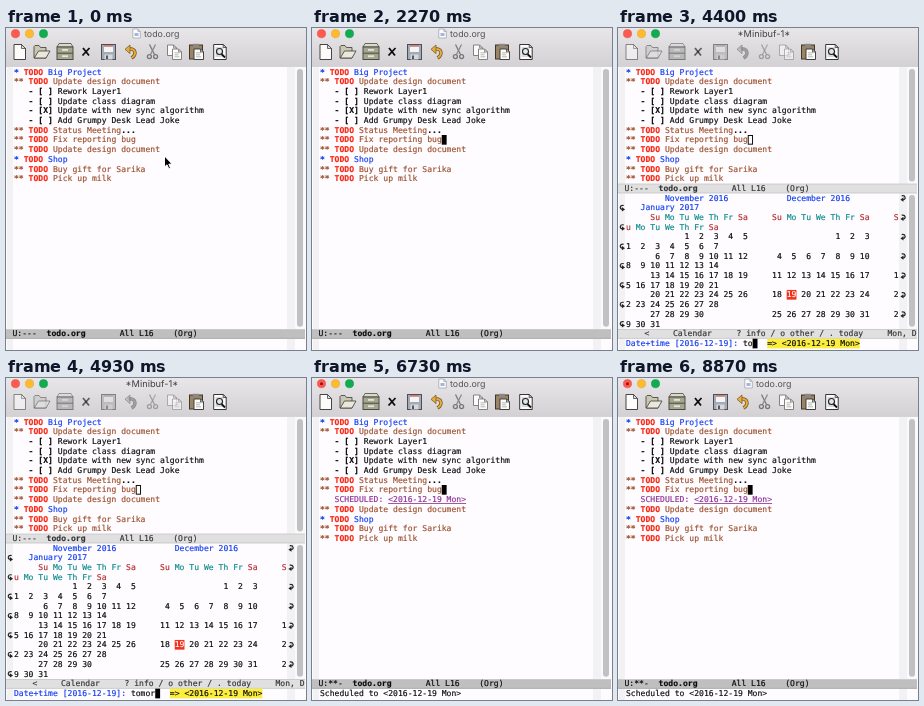
Write an HTML page with a canvas that moves like this. It is 300 px wide and 322 px high and loops after 8.99 s.

```html
<!DOCTYPE html>
<html lang="en">
<head>
<meta charset="utf-8">
<title>todo.org</title>
<style>
html, body { margin: 0; width: 300px; height: 322px; overflow: hidden; background: #fff; }
canvas { display: block; }
</style>
</head>
<body>
<canvas id="stage" width="300" height="322"></canvas>
<script>
const ctx = document.getElementById('stage').getContext('2d');
const LOOP = 8990;
const COL = 4.87, ROW = 9.685, LEFT = 8, TOP = 39.2, WRAP = 56;
const C = {
  paper: '#fefcff', blue: '#0f3cf0', sienna: '#9c4f2c', red: '#fb2512', black: '#0a0a0a',
  teal: '#0a8a8a', brick: '#b3282a', purple: '#8c2f93', fringe: '#f2f1f3', yellow: '#fbee3c', dim: '#333'
};
const MONO = '"DejaVu Sans Mono", monospace';
const SANS = 'Inter, "Liberation Sans", sans-serif';

const rect = (x, y, w, h, color) => { ctx.fillStyle = color; ctx.fillRect(x, y, w, h); };
const frame = (x, y, w, h, color) => { ctx.strokeStyle = color; ctx.lineWidth = 1; ctx.strokeRect(x, y, w, h); };
const rowY = row => TOP + row * ROW;
const colX = col => LEFT + col * COL;

// Type is laid out at ten times its size so that advances stay fractional.
function type(str, x, y, color, size, family, weight = 400, swell = 0) {
  ctx.save();
  ctx.translate(x, y);
  ctx.scale(0.1, 0.1);
  ctx.textRendering = 'geometricPrecision';
  ctx.font = `${weight} ${size * 10}px ${family}`;
  ctx.fillStyle = ctx.strokeStyle = color;
  ctx.fillText(str, 0, 0);
  if (swell) {
    ctx.lineWidth = swell * 10;
    ctx.strokeText(str, 0, 0);
  }
  ctx.restore();
}
const mono = (str, x, row, color = C.black, weight = 400) =>
  type(str, x, rowY(row) + 7.5, color, 8.09, MONO, weight, 0.16);
const put = (str, col, row, color, weight) => mono(str, colX(col), row, color, weight);

function poly(points, fill, stroke, width = 0.8) {
  ctx.beginPath();
  points.forEach(([x, y], i) => i ? ctx.lineTo(x, y) : ctx.moveTo(x, y));
  ctx.closePath();
  if (fill) { ctx.fillStyle = fill; ctx.fill(); }
  if (stroke) { ctx.strokeStyle = stroke; ctx.lineWidth = width; ctx.stroke(); }
}
function line(x1, y1, x2, y2, color, width = 1) {
  ctx.beginPath();
  ctx.moveTo(x1, y1);
  ctx.lineTo(x2, y2);
  ctx.strokeStyle = color;
  ctx.lineWidth = width;
  ctx.stroke();
}
function disc(x, y, r, fill, stroke, width = 0.8) {
  ctx.beginPath();
  ctx.arc(x, y, r, 0, 7);
  if (fill) { ctx.fillStyle = fill; ctx.fill(); }
  if (stroke) { ctx.strokeStyle = stroke; ctx.lineWidth = width; ctx.stroke(); }
}

function page(x, y, w, h, fold = 4, ink = '#333') {
  poly([[x, y], [x + w - fold, y], [x + w, y + fold], [x + w, y + h], [x, y + h]], '#fcfcfa', ink, 0.9);
  poly([[x + w - fold, y], [x + w - fold, y + fold], [x + w, y + fold]], '#ddd', ink, 0.7);
}
function scribble(x, y, w, n) {
  for (let i = 0; i < n; i++) line(x, y + i * 2, x + w - (i % 2), y + i * 2, '#999', 0.7);
}

const icons = {
  blank() { page(8, 16.5, 11.5, 15); },
  folder() {
    poly([[28, 30], [28, 18.5], [29, 17.5], [33, 17.5], [34.5, 19.5], [40, 19.5], [40, 30]], '#c9c8b4', '#3b3b33');
    poly([[28.3, 30], [32.5, 23], [44, 23], [40, 30]], '#e9e8da', '#3b3b33');
  },
  drawer() {
    poly([[51, 19], [53, 15.5], [65, 15.5], [67, 19]], '#d9dbcb', '#4a4c40');
    rect(51, 19, 16, 12.5, '#a3a78f');
    frame(51, 19, 16, 12.5, '#4a4c40');
    line(51, 25.2, 67, 25.2, '#4a4c40');
    rect(56, 21, 6, 1.8, '#e4e5d8');
    rect(56, 27.3, 6, 1.8, '#e4e5d8');
  },
  cross() {
    line(77, 20, 83, 27.5, '#0c0c0c', 1.8);
    line(83.5, 20, 76.5, 27.5, '#0c0c0c', 1.8);
  },
  save() {
    rect(95.5, 16.5, 14, 15, '#a4abb4');
    frame(95.5, 16.5, 14, 15, '#4b5058');
    rect(98, 17, 9, 7, '#f5f5f5');
    rect(98, 17, 9, 1.8, '#c98078');
    rect(98.5, 26.5, 8, 5, '#d5d9dd');
    rect(100, 27.5, 2, 3.5, '#545a64');
  },
  undo() {
    ctx.beginPath();
    ctx.moveTo(122.5, 21);
    ctx.bezierCurveTo(130.5, 20, 130.5, 27, 125.5, 30);
    ctx.strokeStyle = '#6b5120';
    ctx.lineWidth = 3.4;
    ctx.stroke();
    ctx.strokeStyle = '#e9ab3c';
    ctx.lineWidth = 2;
    ctx.stroke();
    poly([[119, 21.3], [124, 17], [124, 25.6]], '#e9ab3c', '#6b5120', 0.7);
  },
  cut() {
    line(143.5, 16.5, 148.5, 26.5, '#777', 1.3);
    line(149.5, 16.5, 144.5, 26.5, '#888', 1.3);
    disc(143.4, 28.6, 2, null, '#777', 1.3);
    disc(149.6, 28.6, 2, null, '#777', 1.3);
  },
  copy() {
    page(161.5, 17, 9, 10.5, 3, '#777');
    page(166.5, 21, 9, 10.5, 3, '#777');
    scribble(168.5, 24.8, 5, 3);
  },
  paste() {
    rect(183.5, 17, 13, 14, '#9a8466');
    frame(183.5, 17, 13, 14, '#40352a');
    rect(187, 15.8, 6, 3, '#888');
    page(188, 21, 9.5, 10.5, 3);
    scribble(190, 24.8, 5, 3);
  },
  find() {
    page(207.7, 16.5, 12.5, 15, 3, '#222');
    scribble(209.5, 20, 8, 5);
    line(215.5, 26, 219, 29.5, '#111', 1.8);
    disc(213.5, 23.5, 3, 'rgba(225,232,238,.9)', '#222', 1.1);
  }
};

function chrome(title, prompt, edited) {
  const g = ctx.createLinearGradient(0, 0, 0, 38);
  g.addColorStop(0, '#e8e6e8');
  g.addColorStop(1, '#d3d1d3');
  rect(0, 0, 300, 38, g);
  rect(0, 38, 300, 0.6, '#b9b9b9');
  disc(9.5, 5.7, 4.1, '#ff5a50', '#e2463d', 0.5);
  disc(23.5, 5.7, 4.1, '#ffbb30', '#dfa023', 0.5);
  disc(37.5, 5.7, 4.1, '#10ac50', '#0d9645', 0.5);
  if (edited) disc(9.5, 5.7, 1.5, '#8c1410');
  if (prompt) {
    type(title, 119.5, 8.6, '#404040', 9.3, SANS);
  } else {
    page(126.8, 1, 7.5, 9, 2.5, '#a9adbb');
    rect(128.5, 5, 4, 3, '#a9b4dc');
    type(title, 138, 8.6, '#555', 8.9, SANS);
  }
  for (const name in icons) {
    const faded = prompt && !/paste|find/.test(name);
    ctx.filter = faded ? 'grayscale(1)' : 'none';
    ctx.globalAlpha = faded ? 0.6 : 1;
    icons[name]();
  }
  ctx.filter = 'none';
  ctx.globalAlpha = 1;
}

function body() {
  rect(0, 38, 300, 284, C.paper);
  rect(1, 39, 6, 283, C.fringe);
  rect(281, 39, 8, 283, C.fringe);
}

function scrollbar(top, bottom) {
  rect(289, top, 10, bottom - top, '#faf9fb');
  line(294, top + 5, 294, bottom - 5, '#c1c0c3', 6);
  disc(294, top + 5, 3, '#c1c0c3');
  disc(294, bottom - 5, 3, '#c1c0c3');
}

function modeline(row, active) {
  rect(0, rowY(row) + 0.3, 299, ROW - 0.1, active ? '#bfbfbf' : '#e0e0e0');
  rect(0, rowY(row) + 0.3, 299, 0.7, active ? '#d0d0d0' : '#c4c4c4');
  rect(0, rowY(row + 1) - 0.5, 299, 0.7, active ? '#9c9c9c' : '#c0c0c0');
}
function fileLine(row, flags, active) {
  const color = active ? C.black : C.dim;
  modeline(row, active);
  mono('U:' + flags, 6.5, row, color);
  mono('todo.org', 6.5 + 7 * COL, row, color, 700);
  mono('All L16    (Org)', 6.5 + 22 * COL, row, color);
}

const outline = [
  [1, 'Big Project'],
  [2, 'Update design document'],
  [0, ' ', 'Rework Layer1'],
  [0, ' ', 'Update class diagram'],
  [0, 'X', 'Update with new sync algorithm'],
  [0, ' ', 'Add Grumpy Desk Lead Joke'],
  [2, 'Status Meeting'],
  [2, 'Fix reporting bug'],
  [2, 'Update design document'],
  [1, 'Shop'],
  [2, 'Buy gift for Sarika'],
  [2, 'Pick up milk']
];

function org(scheduled) {
  outline.forEach(([level, head, item], i) => {
    const row = i + (scheduled && i > 7 ? 1 : 0);
    if (!level) {
      put('-', 3, row, C.black, 700);
      put(`[${head}]`, 5, row, C.black, 700);
      put(item, 9, row);
      return;
    }
    const color = level === 1 ? C.blue : C.sienna;
    put('*'.repeat(level), 0, row, color, 700);
    put('TODO', level + 1, row, C.red, 700);
    put(head, level + 6, row, color);
    if (i === 6) put('...', level + 6 + head.length, row, C.black, 700);
  });
  if (scheduled) {
    put('SCHEDULED:', 3, 8, C.purple);
    put('<2016-12-19 Mon>', 14, 8, C.purple);
    rect(colX(14), rowY(8) + 8.4, 16 * COL, 0.8, C.purple);
  }
}

// Prints one long calendar line, folded at the window width.
function fold(str, col, row, color) {
  const cut = Math.max(0, Math.min(str.length, WRAP - col));
  if (cut) put(str.slice(0, cut), col, row, color);
  if (cut < str.length) put(str.slice(cut), Math.max(0, col - WRAP), row + 1, color);
}

function bend(x, y, dir) {
  ctx.save();
  ctx.translate(x, y);
  ctx.scale(dir, 1);
  ctx.beginPath();
  ctx.moveTo(-1.5, -2.3);
  ctx.bezierCurveTo(2.8, -3, 2.8, 1.6, 0, 1.6);
  ctx.strokeStyle = '#222';
  ctx.lineWidth = 1.2;
  ctx.stroke();
  poly([[-2.8, 1.6], [0.3, -0.8], [0.3, 3.6]], '#222');
  ctx.restore();
}

function calendar() {
  const months = [['November 2016', 2, 30], ['December 2016', 4, 31], ['January 2017', 0, 31]];
  months.forEach(([name, first, days], m) => {
    const col = 5 + 25 * m;
    fold(name, col + Math.floor((20 - name.length) / 2), 13, C.blue);
    'Su Mo Tu We Th Fr Sa'.split(' ').forEach((day, i) =>
      fold(day, col + 3 * i, 15, i % 6 ? C.teal : C.brick));
    for (let d = 1; d <= days; d++) {
      const cell = first + d - 1;
      const x = col + 3 * (cell % 7), row = 17 + 2 * Math.floor(cell / 7);
      const picked = m === 1 && d === 19;
      if (picked) rect(colX(x), rowY(row), 2 * COL, ROW, '#f5301c');
      fold(String(d).padStart(2), x, row, picked ? '#fff' : C.black);
    }
  });
  for (let row = 13; row < 27; row += 2) {
    bend(285.2, rowY(row) + 5, 1);
    bend(4.2, rowY(row + 1) + 5, -1);
  }
  modeline(27, false);
  mono('<', 26.5, 27, C.dim);
  mono('Calendar', 55, 27, C.dim);
  mono('? info / o other / . today', 118.5, 27, C.dim);
  mono('Mon, D', 269.5, 27, C.dim);
}

function prompt(typed, cursorOn) {
  const end = 24 + typed.length;
  put('Date+time [2016-12-19]:', 0, 28, C.blue);
  put(typed, 24, 28);
  if (cursorOn) rect(colX(end), rowY(28) + 0.3, COL, ROW, '#000');
  rect(colX(end + 3), rowY(28) + 0.3, 19 * COL, ROW, C.yellow);
  put('=> <2016-12-19 Mon>', end + 3, 28);
}

function pointer(x, y) {
  poly([[x, y], [x, y + 11], [x + 2.5, y + 8.8], [x + 4.3, y + 12.8], [x + 6, y + 12],
    [x + 4.3, y + 8.2], [x + 7.6, y + 8]], '#000', '#fff', 1);
}

const within = (t, spans) => spans.some(([a, b]) => t >= a && t < b);
const MAIN_ON = [[270, 730], [1270, 1730], [2270, 2530], [6730, 7270], [7730, 8270], [8800, LOOP]];
const PROMPT_ON = [[2530, 3000], [3530, 4000], [4270, 5870], [6330, 6730]];
const KEYS = [4270, 4400, 4530, 4670, 4870, 5070, 5200, 5330];

function draw(t) {
  const asking = t >= 2530 && t < 6730, done = t >= 6730;
  body();
  chrome(asking ? '*Minibuf-1*' : 'todo.org', asking, done);
  org(done);
  if (asking) {
    scrollbar(39, rowY(12));
    scrollbar(rowY(13), rowY(27));
    frame(colX(25) + 0.5, rowY(7) + 0.5, COL - 0.6, ROW - 1, '#111');
    fileLine(12, '---', false);
    calendar();
    prompt('tomorrow'.slice(0, KEYS.filter(k => t >= k).length), within(t, PROMPT_ON));
  } else {
    scrollbar(39, rowY(27));
    if (within(t, MAIN_ON)) rect(colX(25), rowY(7), COL, ROW, '#000');
    fileLine(27, done ? '**-' : '---', true);
    if (done) put('Scheduled to <2016-12-19 Mon>', 0, 28);
    if (t < 2130) pointer(158.5, 128);
  }
}

const start = performance.now();
function tick() {
  draw((performance.now() - start) % LOOP);
  requestAnimationFrame(tick);
}
tick();
</script>
</body>
</html>
```
